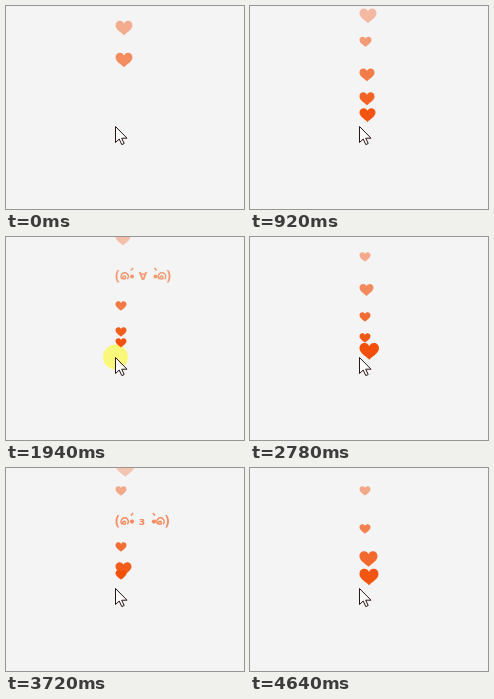
These frames come from a looping animation (238x203 px, 4710 ms). An HTML page with a canvas:

```html
<!DOCTYPE html>
<html lang="en">
<head>
<meta charset="utf-8">
<style>
  html, body { margin: 0; width: 100%; height: 100%; overflow: hidden; background: #f4f4f4; }
  canvas { display: block; }
</style>
</head>
<body>
<canvas id="stage" width="238" height="203"></canvas>
<script>
const ctx = document.getElementById('stage').getContext('2d');
const LOOP = 4710, STEP = 77.2, RISE = 160, LIFE = 1500;
const ORANGE = '#f2500a';

// Click time in ms, then heart width or the mouth of a face
const clicks = [
  [-813, 17], [-621, 17], [39, 17], [220, 12], [412, 15], [598, 15], [800, 16], [1003, 15],
  [1220, '∀'], [1438, 11], [1656, 11], [1825, 11], [1982, 11], [2167, 14], [2368, 11],
  [2581, 11], [2745, 19.5], [2927, 11], [3081, 'з'], [3288, 11], [3455, 16], [3635, 11],
  [3853, 11], [4086, 11], [4266, 18], [4459, 19],
];

const heart = new Path2D('M.5 .43C.36 .27 0 .1 0-.16C0-.33 .12-.43 .26-.43C.37-.43 .46-.37 .5-.26C.54-.37 .63-.43 .74-.43C.88-.43 1-.33 1-.16C1 .1 .64 .27 .5 .43Z');
const pointer = new Path2D('M109.5 120.5V136.5L113.2 133L115.8 138.6L118.2 137.5L115.7 132.2H121Z');

function disc(x, y, r) {
  ctx.beginPath();
  ctx.arc(x, y, r, 0, 7);
  ctx.fill();
}

function drawHeart(y, width) {
  ctx.save();
  ctx.translate(109.5, y);
  ctx.scale(width, width);
  ctx.fill(heart);
  ctx.restore();
}

function glyph(text, x, y, font) {
  ctx.font = font;
  ctx.fillText(text, x, y);
}

function curl(x) {
  ctx.beginPath();
  ctx.arc(x, 0.5, 3.7, Math.PI * 0.75, Math.PI * 2.25);
  ctx.moveTo(x + 1, 1.6);
  ctx.arc(x - 0.5, 1.6, 1.5, 0, 7);
  ctx.stroke();
}

function eye(x, slant) {
  disc(x, 0.5, 2.1);
  ctx.beginPath();
  ctx.moveTo(x - slant, -5.6);
  ctx.lineTo(x + slant, -8);
  ctx.stroke();
}

function drawFace(y, mouth) {
  const wide = mouth === '∀';
  const shift = wide ? 0 : -1.5;
  ctx.save();
  ctx.translate(109, y);
  ctx.lineWidth = 1.5;
  ctx.textAlign = 'center';
  ctx.textBaseline = 'alphabetic';
  const bracket = 'bold 14px "Open Sans", sans-serif';
  glyph('(', 2.3, 4, bracket);
  curl(9.7);
  eye(17, 1.2);
  glyph(mouth, wide ? 28 : 27, 4.2, 'bold 11px "DejaVu Sans", sans-serif');
  eye(40.5 + shift, -1.2);
  curl(47 + shift);
  glyph(')', 53.7 + shift, 4, bracket);
  ctx.restore();
}

function draw(now) {
  const t = STEP * Math.min(60, Math.floor((now % LOOP + 8) / STEP));
  ctx.globalAlpha = 1;
  ctx.fillStyle = '#f4f4f4';
  ctx.fillRect(0, 0, 238, 203);

  if (t > 0 && clicks.some(([at]) => t > at - 70 && t < at + 10)) {
    ctx.fillStyle = '#faf87a';
    disc(109.5, 120, 12.5);
  }

  ctx.fillStyle = ctx.strokeStyle = ORANGE;
  for (const [at, kind] of clicks) {
    const age = (t - at) / LIFE;
    if (age < 0 || age >= 1) continue;
    const swing = (1 - Math.cos(Math.PI * age)) / 2;
    ctx.globalAlpha = 1 - swing;
    if (typeof kind === 'string') drawFace(112.3 - RISE * swing, kind);
    else drawHeart(99 + 0.8 * kind - RISE * swing, kind);
  }

  ctx.globalAlpha = 1;
  ctx.lineWidth = 1;
  ctx.fillStyle = '#fff';
  ctx.strokeStyle = '#2a1414';
  ctx.fill(pointer);
  ctx.stroke(pointer);
}

const start = performance.now();
(function tick() {
  draw(performance.now() - start);
  requestAnimationFrame(tick);
})();
</script>
</body>
</html>
```
